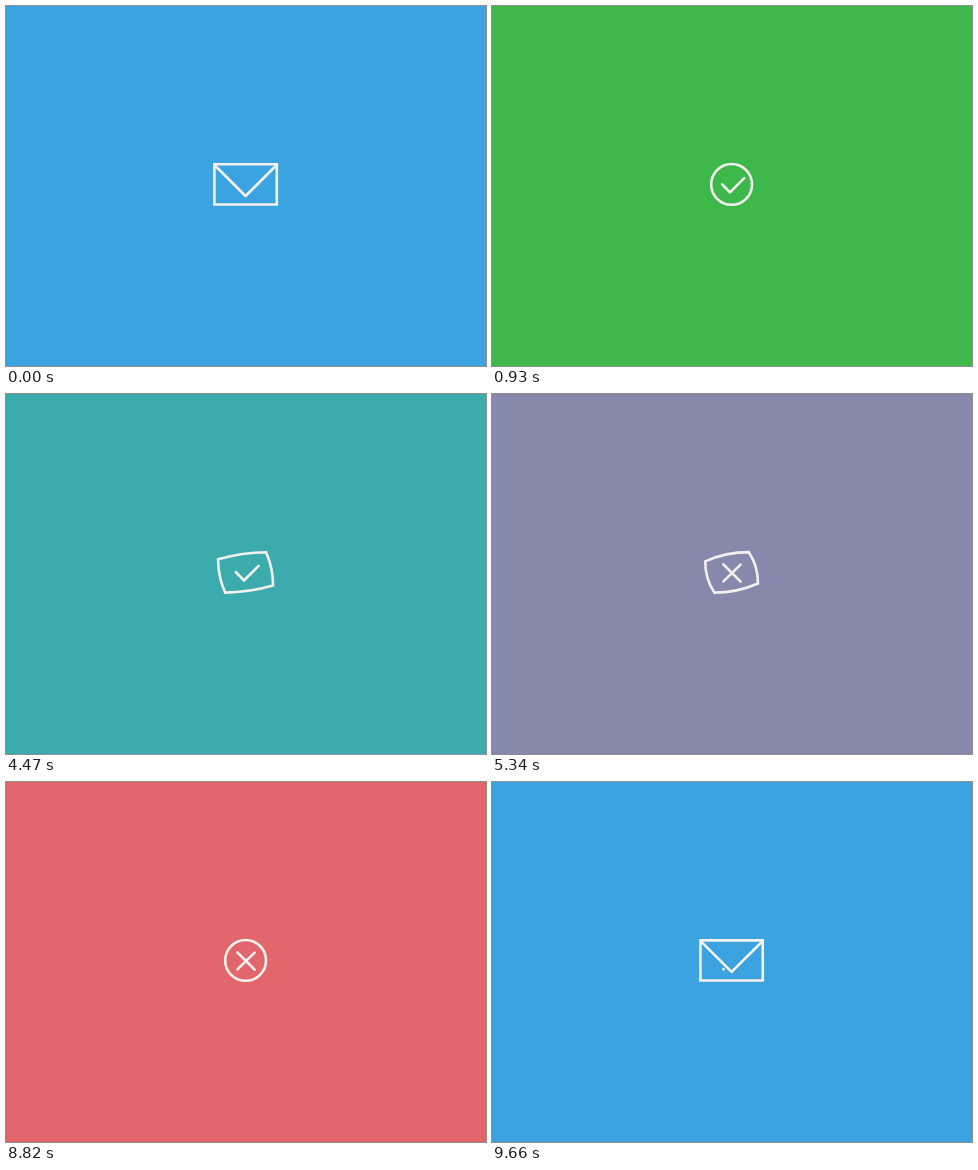
Animation, 480 px wide and 360 px high, one loop 9690 ms. Source, as an HTML page:

```html
<!DOCTYPE html>
<html lang="en">
<head>
<meta charset="utf-8">
<title>Mail status</title>
<style>
html, body { margin: 0; height: 100%; overflow: hidden; background: #3ba4e0; }
svg { display: block; width: 100%; height: 100%; }
path { fill: none; stroke: #f2f1ed; stroke-width: 2.6; stroke-linecap: round; stroke-linejoin: round; }
#outline { stroke-linejoin: miter; }
</style>
</head>
<body>
<svg viewBox="0 0 480 360">
  <rect id="back" width="480" height="360"/>
  <path id="outline"/>
  <path id="mark"/>
  <path id="slash"/>
</svg>
<script>
const LOOP = 9690;
const CX = 239.6, CY = 178.4, W = 31.2, H = 20.1, R = 20.4, K = R * 0.5523;
const BLUE = [59, 164, 224], GREEN = [62, 183, 75], RED = [226, 102, 107];
const FLAP = [[209, 159.5], [239.6, 190], [270.2, 159.5]];
const CHECK = [[230.2, 178.4], [238, 186.4], [252.2, 172.2]];
const CROSS = [[231.4, 170.4], [240, 179], [248.6, 187.6]];
const SLASH = [[231.4, 187.4], [248.6, 170.6]];

const $ = id => document.getElementById(id);
const clamp = x => Math.min(1, Math.max(0, x));
const ease = x => x < 0.5 ? 2 * x * x : 1 - 2 * (1 - x) ** 2;
const mix = (a, b, k) => a.map((v, i) => v + (b[i] - v) * k);
const mixAll = (a, b, k) => a.map((p, i) => mix(p, b[i], k));
const line = pts => 'M' + pts.join('L');

// Each corner of the envelope travels to a quarter point of the circle.
const corners = [[-W, -H], [W, -H], [W, H], [-W, H]];
const quarters = [[-R, 0], [0, -R], [R, 0], [0, R]];

function outline(k) {
  const at = p => [CX + p[0], CY + p[1]];
  let d = 'M' + at(mix(corners[0], quarters[0], k));
  for (let i = 0; i < 4; i++) {
    const j = (i + 1) % 4;
    const a = corners[i], b = corners[j], p = quarters[i], q = quarters[j];
    const c1 = [p[0] + q[0] * K / R, p[1] + q[1] * K / R];
    const c2 = [q[0] + p[0] * K / R, q[1] + p[1] * K / R];
    d += 'C' + [
      mix(mix(a, b, 1 / 3), c1, k),
      mix(mix(a, b, 2 / 3), c2, k),
      mix(b, q, k)
    ].map(at).join(' ');
  }
  return d + 'Z';
}

const span = (t, from, to) => clamp((t - from) / (to - from));

function draw(t) {
  const bad = t >= 4880;
  const p = bad
    ? span(t, 4910, 5820) - span(t, 8810, LOOP)
    : span(t, 20, 930) - span(t, 3920, 4860);
  const k = ease(p), m = ease(clamp(p / 0.46));
  $('back').style.fill = `rgb(${mix(BLUE, bad ? RED : GREEN, k).map(Math.round)})`;
  $('outline').setAttribute('d', outline(k));
  $('mark').setAttribute('d', line(mixAll(FLAP, bad ? CROSS : CHECK, m)));
  $('slash').setAttribute('d', bad && m > 0 ? line([SLASH[0], mix(...SLASH, m)]) : '');
}

const start = performance.now();
function tick() {
  draw((performance.now() - start) % LOOP);
  requestAnimationFrame(tick);
}
tick();
</script>
</body>
</html>
```
